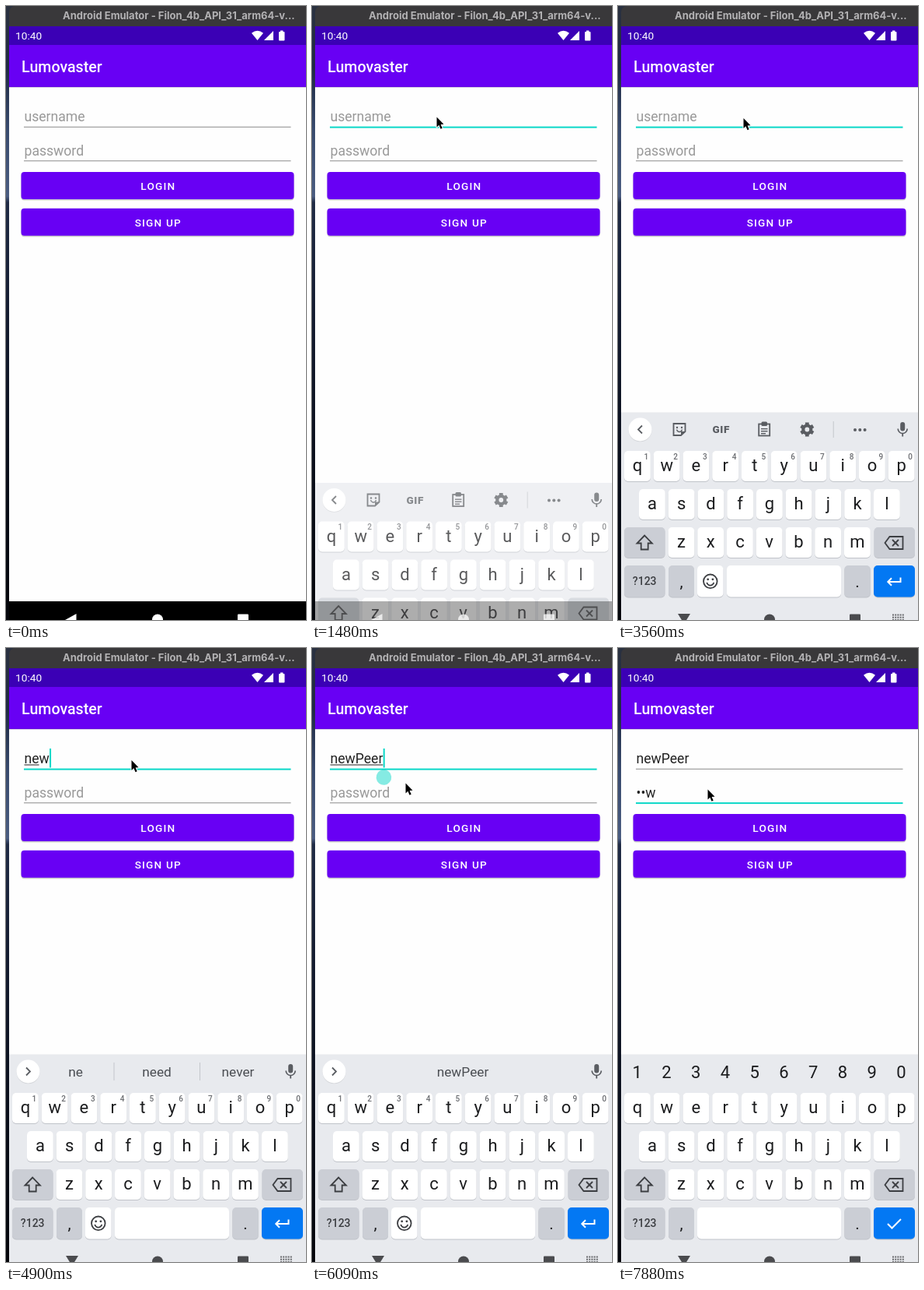
Animation of 386 by 788 pixels, one loop 8000 ms. Source, as an HTML page with a canvas:

```html
<!DOCTYPE html>
<html lang="en">
<head>
<meta charset="utf-8">
<title>Login screen</title>
<style>
html, body { margin: 0; width: 100%; height: 100%; overflow: hidden; background: #fff; }
canvas { display: block; width: 386px; height: 788px; }
</style>
</head>
<body>
<canvas id="stage"></canvas>
<script>
const W = 386, H = 788, LOOP = 8000;
const PURPLE = '#6800f4', TEAL = '#0bd8c8', ICON = '#5a5d62', INK = '#1b1c1e', KB = '#e8eaee';
const canvas = document.getElementById('stage');
const ctx = canvas.getContext('2d');
const ratio = window.devicePixelRatio || 1;
canvas.width = W * ratio;
canvas.height = H * ratio;

// ---- helpers ----
function rect(x, y, w, h, color) {
  ctx.fillStyle = color;
  ctx.fillRect(x, y, w, h);
}
function round(x, y, w, h, r, color) {
  ctx.fillStyle = color;
  ctx.beginPath();
  ctx.roundRect(x, y, w, h, r);
  ctx.fill();
}
function disc(x, y, r, color) {
  ctx.fillStyle = color;
  ctx.beginPath();
  ctx.arc(x, y, r, 0, Math.PI * 2);
  ctx.fill();
}
function ring(x, y, r, color, width) {
  ctx.strokeStyle = color;
  ctx.lineWidth = width;
  ctx.beginPath();
  ctx.arc(x, y, r, 0, Math.PI * 2);
  ctx.stroke();
}
function trace(points, closed) {
  ctx.beginPath();
  points.forEach(([x, y], i) => i ? ctx.lineTo(x, y) : ctx.moveTo(x, y));
  if (closed) ctx.closePath();
}
function poly(points, color) {
  trace(points, true);
  ctx.fillStyle = color;
  ctx.fill();
}
function line(points, color, width, closed) {
  trace(points, closed);
  ctx.strokeStyle = color;
  ctx.lineWidth = width;
  ctx.stroke();
}
function text(str, x, y, size, color, align = 'left', weight = 400, family = 'Roboto', spacing = 0) {
  ctx.font = `${weight} ${size}px ${family}, sans-serif`;
  ctx.textAlign = align;
  ctx.letterSpacing = spacing + 'px';
  ctx.fillStyle = color;
  ctx.fillText(str, x, y);
  return ctx.measureText(str).width;
}
// value of the last entry [time, value] that has started
function pick(list, t) {
  let value = list[0][1];
  for (const [start, v] of list) if (t >= start) value = v;
  return value;
}

// ---- timeline ----
const NAME = 'newPeer';
const typedName = [[0, 0], [4750, 2], [4900, 3], [5200, 4], [5350, 5], [5500, 6], [5650, 7]];
const typedPass = [[0, ''], [7280, '•e'], [7430, '••w']];
const nameCaret = [[0, 0], [1040, 1], [1480, 0], [2060, 1], [2510, 0], [2960, 1], [3560, 0],
  [4010, 1], [4460, 0], [4750, 1], [6390, 0]];
const passCaret = [[0, 0], [6390, 1], [6840, 0], [7280, 1], [7880, 0]];
const handleAlpha = [[0, 0], [5940, 1], [6090, 0.5], [6240, 0]];
const keyboardDrop = [[0, null], [1340, 205], [1480, 90.5], [1620, 0]];
const latePointer = [[1480, [160.5, 142.5]], [1620, [161.5, 144]], [5940, [150, 152]],
  [6090, [120.5, 173.5]], [6240, [118, 179]], [6390, [116.5, 181]], [6540, [115.5, 181.5]]];

function pointerAt(t) {
  if (t < 300) return null;
  if (t >= 1480) return pick(latePointer, t);
  const p = Math.min(1, Math.floor((t - 300) / 148) / 4);
  const rest = Math.pow(1 - p, 1.6);
  return [160.5 + 208 * rest, 142.5 + 299 * rest];
}

// ---- window and app ----
function drawWindow() {
  const g = ctx.createLinearGradient(0, 0, 0, H);
  [[0, '#2a3140'], [0.1, '#1f2a42'], [0.2, '#384a6d'], [0.31, '#4a5c80'], [0.32, '#202b45'],
    [0.5, '#141c30'], [0.78, '#090d18'], [1, '#04060b']].forEach(([p, c]) => g.addColorStop(p, c));
  rect(0, 0, W, H, g);
  round(4, 0, W, 40, [8, 0, 0, 0], '#39383a');
  text('Android Emulator - Filon_4b_API_31_arm64-v...', 73, 16.5, 13, '#b3b2b4', 'left', 700, 'Inter');
  rect(4, 26, W, 24, '#3b00b5');
  rect(4, 50, W, 54, PURPLE);
  rect(4, 104, W, 660, '#fefefe');
  rect(4, 103.5, W, 1, 'rgba(80,40,140,.4)');
  text('10:40', 12, 43, 13.7, '#fff');
  ctx.fillStyle = '#fff';
  ctx.beginPath();
  ctx.moveTo(323.5, 44);
  ctx.lineTo(316, 34.8);
  ctx.quadraticCurveTo(323.5, 28.6, 331, 34.8);
  ctx.fill();
  poly([[332, 44], [344, 44], [344, 32]], '#fff');
  round(351, 33, 7.5, 11.5, 1, '#fff');
  rect(353, 31.5, 3.5, 2, '#fff');
  text('Lumovaster', 20, 84.5, 19.6, '#fff', 'left', 500);
}

function button(y, label) {
  round(19.5, y + 1, 351, 35.5, 4, 'rgba(0,0,0,.2)');
  round(19.5, y, 351, 35, 4, PURPLE);
  text(label, 195.8, y + 22.8, 13.6, '#fff', 'center', 500, 'Roboto', 1.2);
}

function field(y, value, hint, focused, caret, composing) {
  const width = value ? text(value, 23.5, y, 17.6, '#222') : 0;
  if (!value) text(hint, 23.5, y, 17.6, '#999');
  if (composing) {
    ctx.font = '400 17.6px Roboto, sans-serif';
    rect(23.5, y + 1.5, ctx.measureText(value.slice(0, composing)).width, 1, '#222');
  }
  if (focused) rect(23, y + 6.6, 343.5, 2, TEAL);
  else rect(23, y + 6.8, 343.5, 1, '#8b8b8b');
  if (caret) rect(23.8 + width, y - 19, 2, 24.5, TEAL);
  return width;
}

function drawForm(t) {
  const count = pick(typedName, t);
  const composing = t >= 6240 ? 0 : count < 4 ? Math.min(count, 2) : count;
  const width = field(148, NAME.slice(0, count), 'username', t >= 1040 && t < 6240, pick(nameCaret, t), composing);
  field(191.5, pick(typedPass, t), 'password', t >= 6240, pick(passCaret, t), 0);
  const alpha = pick(handleAlpha, t);
  if (alpha) {
    const x = 24.5 + width;
    ctx.globalAlpha = alpha;
    ctx.fillStyle = TEAL;
    ctx.beginPath();
    ctx.arc(x, 166, 9.8, -0.9, Math.PI + 0.9);
    ctx.lineTo(x, 155);
    ctx.fill();
    ctx.globalAlpha = 1;
  }
  button(213, 'LOGIN');
  button(259.7, 'SIGN UP');
}

// ---- keyboard ----
function key(x, y, w, h, color = '#fff') {
  round(x, y + 1, w, h, 5, '#c0c3c9');
  round(x, y, w, h, 5, color);
}
function keyRow(letters, left, y, hints) {
  [...letters].forEach((c, i) => {
    const x = left + i * 37.75;
    key(x, y, 33.8, 39);
    text(c, x + 16.9, y + 26, 22, INK, 'center');
    if (hints) text(String((i + 1) % 10), x + 28.3, y + 10.5, 10, '#6b6d71', 'center', 500);
  });
}
function mic() {
  round(363.2, 534, 6, 11.5, 3, ICON);
  ctx.strokeStyle = ICON;
  ctx.lineWidth = 1.7;
  ctx.beginPath();
  ctx.arc(366.2, 542.5, 6, 0, Math.PI);
  ctx.stroke();
  rect(365.3, 548, 1.8, 4.5, ICON);
}
function chevron(dir) {
  disc(28.5, 544.3, 15, '#d3d5d9');
  disc(28.5, 543.5, 15, '#fff');
  line([[28.5 - 2.5 * dir, 538.5], [28.5 + 2.5 * dir, 543.5], [28.5 - 2.5 * dir, 548.5]], ICON, 1.8);
}
function tools() {
  chevron(-1);
  // sticker
  line([[71.5, 536], [86.5, 536], [86.5, 546], [81, 551], [71.5, 551]], ICON, 1.8, true);
  poly([[81, 551], [81, 546], [86.5, 546]], ICON);
  disc(76, 541, 1.2, ICON);
  disc(82, 541, 1.2, ICON);
  ctx.lineWidth = 1.5;
  ctx.beginPath();
  ctx.arc(79, 543, 3.5, 0.2, Math.PI - 0.2);
  ctx.stroke();
  text('GIF', 132.7, 548.3, 13.5, ICON, 'center', 900, 'Roboto', 0.6);
  // clipboard
  ctx.strokeStyle = ICON;
  ctx.lineWidth = 1.8;
  ctx.strokeRect(181.2, 536.5, 14, 15);
  round(184.5, 533.5, 7.5, 5.5, 1.5, ICON);
  [542, 545, 548].forEach((y, i) => rect(184, y, i === 2 ? 6 : 8.5, 1.4, ICON));
  // gear
  ring(243.3, 543.5, 5, ICON, 4.2);
  for (let i = 0; i < 6; i++) {
    ctx.save();
    ctx.translate(243.3, 543.5);
    ctx.rotate(i * Math.PI / 3);
    rect(-2.4, -9, 4.8, 4, ICON);
    ctx.restore();
  }
  rect(276.7, 533, 1, 21, '#c3c6cb');
  [305, 311.3, 317.6].forEach(x => disc(x, 544, 2, ICON));
  mic();
}
function suggestions(words) {
  chevron(1);
  if (words.length === 1) text(words[0], 194, 550, 17.3, '#4b4e53', 'center');
  else {
    words.forEach((w, i) => text(w, 89.5 + i * 104.5, 550, 17.3, '#4b4e53', 'center'));
    rect(138.5, 532, 1, 23, '#c3c6cb');
    rect(249, 532, 1, 23, '#c3c6cb');
  }
  mic();
}
function bottomRow(password) {
  const gray = '#cbced5', y = 718, h = 40.5;
  key(8, y, 52.5, h, gray);
  text('?123', 34.2, y + 25.3, 14, '#3c3e42', 'center', 500);
  key(65, y, 33, h, gray);
  text(',', 81.5, y + 28, 21, INK, 'center');
  if (password) key(102, y, 185, h);
  else {
    key(102, y, 33.5, h);
    ring(118.8, 738.3, 8.8, '#3c3e42', 1.8);
    disc(115.7, 735.8, 1.4, '#3c3e42');
    disc(121.9, 735.8, 1.4, '#3c3e42');
    ctx.beginPath();
    ctx.arc(118.8, 739, 4.6, 0.2, Math.PI - 0.2);
    ctx.stroke();
    key(140, y, 147, h);
  }
  key(291.3, y, 33.5, h, gray);
  text('.', 308, y + 28, 21, INK, 'center');
  key(329, y, 53, h, '#0378f3');
  if (password) line([[347, 739], [352.5, 744.5], [364, 733]], '#fff', 2);
  else {
    line([[363.5, 733.5], [363.5, 739], [347.5, 739]], '#fff', 2);
    line([[352, 734.3], [347.3, 739], [352, 743.7]], '#fff', 2);
  }
}

function drawKeyboard(t) {
  const password = t >= 6390;
  rect(4, 521.5, W, 520, KB);
  if (password) {
    for (let i = 0; i < 10; i++) text(String((i + 1) % 10), 24.7 + i * 37.75, 552, 22, INK, 'center');
  } else if (t < 4750) tools();
  else if (t < 5200) suggestions(['ne', 'need', 'never']);
  else suggestions([NAME.slice(0, pick(typedName, t))]);
  keyRow('qwertyuiop', 8, 571, !password);
  keyRow('asdfghjkl', 27, 620);
  keyRow('zxcvbnm', 64.5, 669);
  key(8, 669, 52.5, 39, '#cbced5');
  line([[34.2, 679.5], [24.5, 689.5], [29.7, 689.5], [29.7, 697.5], [38.7, 697.5], [38.7, 689.5], [43.9, 689.5]],
    '#3c3e42', 1.8, true);
  key(329.5, 669, 52.5, 39, '#cbced5');
  line([[343.5, 689], [349.5, 681], [366.5, 681], [366.5, 697], [349.5, 697]], '#3c3e42', 1.8, true);
  line([[353, 685], [361, 693]], '#3c3e42', 1.8);
  line([[361, 685], [353, 693]], '#3c3e42', 1.8);
  bottomRow(password);
}

function navIcons(color, down) {
  if (down) poly([[77, 780], [93, 780], [85, 793]], color);
  else poly([[76, 788], [90.5, 780], [90.5, 796]], color);
  disc(195, 787.5, 7, color);
  round(298, 780.5, 14, 14, 1, color);
}

function drawBottom(t) {
  const drop = pick(keyboardDrop, t);
  if (drop === null) {
    rect(4, 764, W, 24, '#000');
    navIcons('#fff', false);
    return;
  }
  ctx.save();
  ctx.beginPath();
  ctx.rect(4, 104, W, H);
  ctx.clip();
  ctx.translate(0, drop);
  drawKeyboard(t);
  ctx.restore();
  if (drop) {
    rect(4, 521.5 + drop, W, 400, `rgba(254,254,254,${drop / 330})`);
    rect(4, 764, W, 24, `rgba(0,0,0,${0.12 + drop / 450})`);
    navIcons('rgba(255,255,255,.75)', false);
    return;
  }
  navIcons('#4a4b4e', true);
  for (let i = 0; i < 5; i++)
    for (let j = 0; j < 3; j++) rect(353 + i * 3.2, 780.5 + j * 3.2, 2, 2, '#6a6b6e');
}

function drawPointer(t) {
  const p = pointerAt(t);
  if (!p) return;
  ctx.save();
  ctx.translate(p[0], p[1]);
  ctx.lineJoin = 'round';
  const arrow = [[0, 0], [0, 13], [2.9, 10.3], [5, 15.3], [7.2, 14.3], [5.1, 9.5], [9, 9.3]];
  line(arrow, '#fff', 2, true);
  poly(arrow, '#000');
  ctx.restore();
}

function frame(now) {
  const t = now % LOOP;
  ctx.setTransform(ratio, 0, 0, ratio, 0, 0);
  drawWindow();
  drawForm(t);
  drawBottom(t);
  drawPointer(t);
  requestAnimationFrame(frame);
}
requestAnimationFrame(frame);
</script>
</body>
</html>
```
